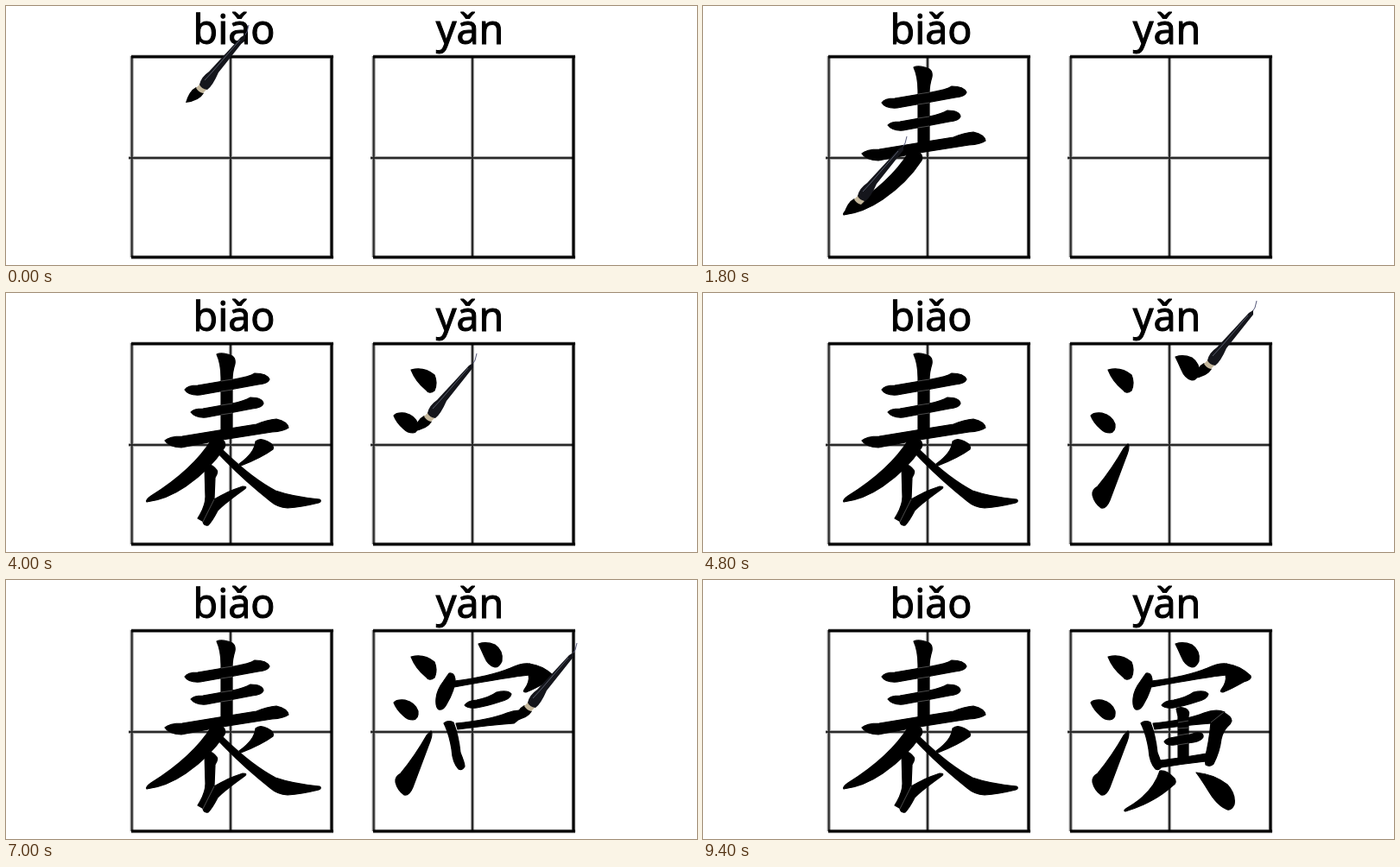
Write an HTML page that moves like this. It is 800 px wide and 300 px high and loops after 9.6 s.

```html
<!DOCTYPE html>
<html lang="zh">
<head>
<meta charset="utf-8">
<title>biǎo yǎn</title>
<style>
  html, body { margin: 0; width: 100%; height: 100%; overflow: hidden; background: #fff; }
  svg { display: block; }
  text { font: 500 46.5px "Noto Sans", "Open Sans", sans-serif; text-anchor: middle; stroke: #000; stroke-width: 1; }
  #ink { stroke: #000; stroke-width: 1.2; stroke-linejoin: round; }
  #ink [data-tips] { visibility: hidden; }
  #ink .seam { fill: none; stroke: #999; stroke-width: .5; }
</style>
</head>
<body>
<svg width="800" height="300" viewBox="0 0 800 300">
  <defs>
    <path id="thin" d="M145.7 58V291M260 58V291M142 176H378"/>
    <path id="thick" d="M145 58.7H379M145 291H379M377 58V292"/>
    <g id="grid" fill="none" stroke="#000">
      <use href="#thin" stroke-width="4.2" stroke-opacity=".35"/>
      <use href="#thin" stroke-width="2" stroke-opacity=".75"/>
      <use href="#thick" stroke-width="4.4" stroke-opacity=".35"/>
      <use href="#thick" stroke-width="3"/>
    </g>
  </defs>
  <use href="#grid"/>
  <use href="#grid" x="280"/>
  <text x="264" y="44">biǎo</text>
  <text x="537" y="44">yǎn</text>

  <!-- data-tips: brush positions, one per step; the ink shows at the last one -->
  <g id="ink">
    <path data-tips="208,112 298,103" d="M207 112Q210 107 222 107L264 100Q282 97 288 93Q302 93 305 100Q303 105 292 106L225 118Q211 119 207 112Z"/>
    <path data-tips="215,139 296,128" d="M214 138Q217 134 228 134L262 128Q276 125 283 121Q297 121 298 128Q296 133 285 134L232 144Q219 145 214 138Z"/>
    <g data-tips="245,72 255,157">
      <path d="M244 71Q250 68 262 73Q266 76 265 82Q262 92 262 100V157L249 159V98Q249 82 244 71Z"/>
      <path class="seam" d="M249 102L262 100M249 114L262 112M249 130L262 128M249 141L262 139"/>
    </g>
    <path data-tips="186,172 322,157" d="M184 171Q189 166 204 166L290 152Q302 147 313 146Q326 149 327 156Q322 160 308 161L250 170L203 179Q188 178 184 171Z"/>
    <path data-tips="242,172 163,241" d="M238 170L251 170Q255 174 253 179Q236 205 208 224Q186 239 163 242Q161 240 168 235Q216 205 238 170Z"/>
    <path data-tips="233,201 230,266" d="M230 200Q237 196 244 205Q246 208 242 214L241 238L229 265L222 261Q231 247 231 236Z"/>
    <g data-tips="276,226">
      <path d="M241 239Q258 229 274 224Q281 224 275 228Q254 243 245 252Q239 264 234 269Q229 270 228 265Z"/>
      <path class="seam" d="M241 239L228 265"/>
    </g>
    <path data-tips="302,176 272,199" d="M289 172Q294 167 303 172Q311 176 309 181Q297 190 272 200L270 198Q288 185 289 172Z"/>
    <path data-tips="247,184 359,240" d="M246 186L251 182Q285 215 312 229Q332 236 363 239Q366 241 362 243Q342 248 326 249Q314 248 306 241Q272 214 246 186Z"/>

    <path data-tips="471,91 492,113" d="M469 89Q484 85 496 95Q500 104 496 113Q490 118 486 112Q474 102 469 89Z"/>
    <path data-tips="450,144 472,160" d="M449 142Q452 138 462 139Q474 142 477 152Q478 161 471 162Q465 162 460 157Q452 150 449 142Z"/>
    <path data-tips="460,246 491,177" d="M492 175Q495 178 489 192L471 240Q467 250 461 249Q453 243 451 234Q450 228 457 224Q474 203 487 180Z"/>
    <path data-tips="549,76 568,99" d="M547 74Q556 71 566 75Q576 82 574 94Q571 101 566 101Q558 99 554 89Q550 80 547 74Z"/>
    <path data-tips="516,109 502,149" d="M513 108Q519 107 520 115Q520 127 510 144Q506 151 501 150Q497 147 498 137Q499 127 506 118Z"/>
    <path data-tips="521,121 606,99" d="M519 117Q560 112 584 102Q597 96 606 97L616 103L606 110Q585 112 519 124Z"/>
    <path data-tips="601,129" d="M606 97Q622 99 634 111Q636 115 626 118Q612 126 602 130Q598 130 600 127Q607 118 605 109Z"/>
    <path data-tips="533,145 582,132" d="M531 145Q534 140 545 139Q560 136 568 130Q581 127 585 132Q584 138 572 141Q557 146 545 148Q534 149 531 145Z"/>
    <path data-tips="510,167 527,217" d="M507 166Q512 162 518 165Q524 180 526 200Q531 212 531 216Q528 221 524 219Q517 212 516 196Q513 178 507 166Z"/>
    <path data-tips="523,170 588,163" d="M521 166Q560 162 580 154Q594 149 604 153L588 166Q560 168 523 173Z"/>
    <g data-tips="584,213">
      <path d="M588 165L602 153Q612 158 612 163Q611 167 607 170Q602 175 600 184Q598 200 591 213Q587 217 582 214L581 207Q586 188 588 165Z"/>
      <path class="seam" d="M588 165L603 153"/>
    </g>
    <path data-tips="536,187 577,181" d="M534 187Q537 183 546 182Q562 180 570 177Q580 176 579 182Q577 186 568 188L546 191Q536 192 534 187Z"/>
    <g data-tips="551,150 555,204">
      <path d="M548 149Q553 146 559 149Q564 152 562 158V205L550 207V158Z"/>
      <path class="seam" d="M550 165L562 163M550 172L562 171M550 180L562 178M550 191L562 189"/>
    </g>
    <path data-tips="530,213 580,209" d="M529 209Q555 206 583 201L582 210Q555 213 531 217Z"/>
    <path data-tips="531,223 490,266" d="M529 221Q537 220 546 230Q549 235 544 238Q522 258 489 268Q486 267 491 264Q521 247 529 221Z"/>
    <path data-tips="573,224 610,262" d="M571 223Q592 225 607 237Q617 248 615 260Q612 267 607 266Q595 261 585 244Q577 231 571 223Z"/>
  </g>

  <g id="brush">
    <path fill="none" stroke="#55587a" d="M67 -76L71 -82L73 -90"/>
    <path d="M0 0Q4 -14 12 -18L21 -11Q16 -2 0 0Z"/>
    <path fill="#c4b79c" d="M12 -17L17 -22L24 -15L20 -11Q15 -12 12 -17Z"/>
    <path fill="#15161c" d="M16 -21Q18 -30 27 -36L64 -76L69 -79L69 -74L38 -35Q31 -19 25 -15Q18 -16 16 -21Z"/>
    <path fill="none" stroke="#555a68" d="M22 -26L32 -37L63 -73"/>
  </g>
</svg>
<script>
  const STEP = 200, LOOP = 9600;
  const brush = document.getElementById('brush');
  const tips = [];
  const strokes = [...document.querySelectorAll('#ink [data-tips]')].map(shape => {
    tips.push(...shape.dataset.tips.split(' '));
    return { shape, shownAt: tips.length - 1 };
  });

  function draw() {
    const step = Math.floor(performance.now() % LOOP / STEP);
    for (const { shape, shownAt } of strokes)
      shape.style.visibility = step >= shownAt ? 'visible' : 'hidden';
    const tip = tips[step];
    brush.style.display = tip ? '' : 'none';
    if (tip) brush.setAttribute('transform', `translate(${tip})`);
    requestAnimationFrame(draw);
  }
  draw();
</script>
</body>
</html>
```
